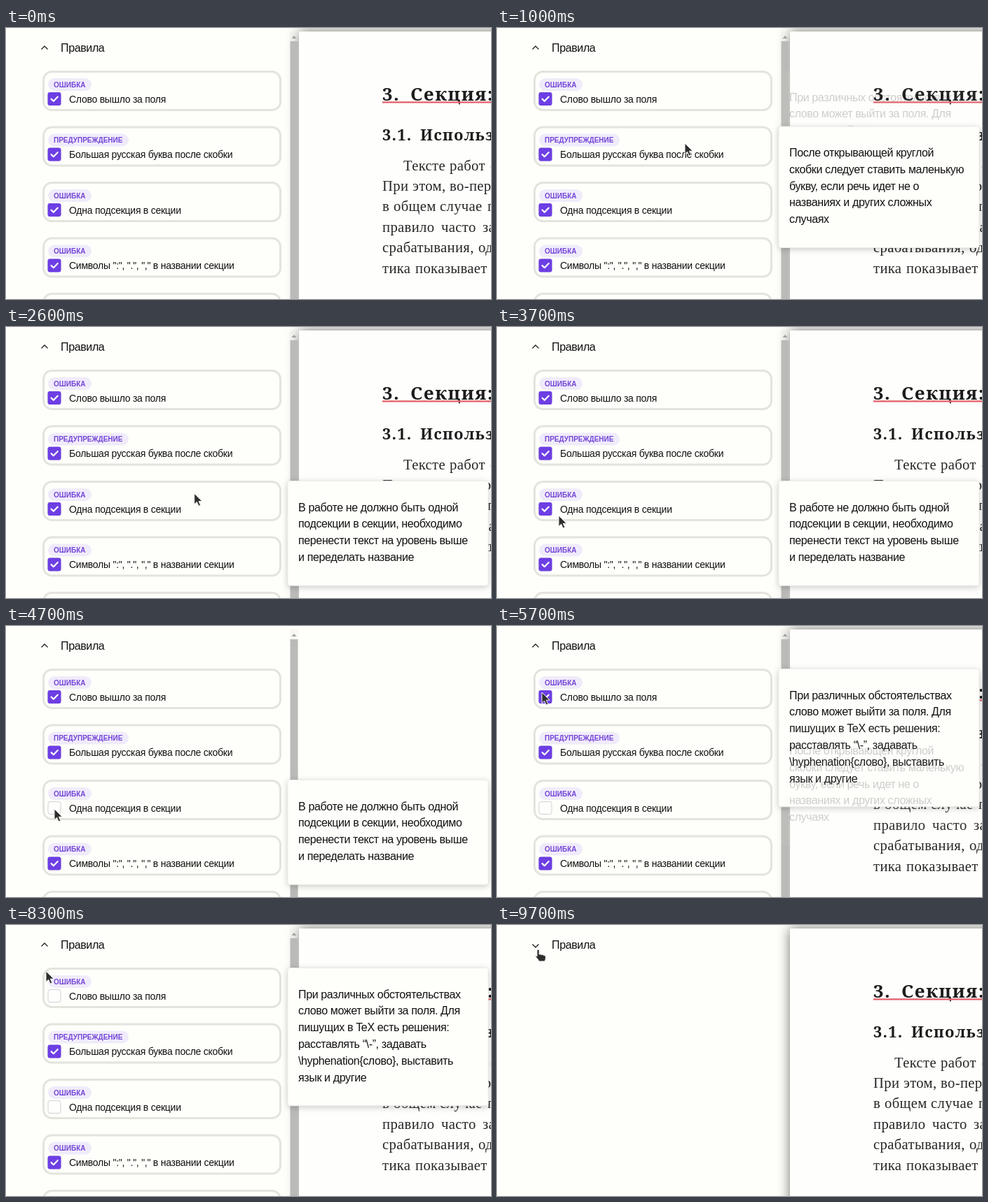
An HTML page that plays this animation: 692x388 px, repeating every 10000 ms.

```html
<!DOCTYPE html>
<html lang="ru">
<head>
<meta charset="utf-8">
<title>Правила</title>
<style>
  html, body { margin: 0; width: 100%; height: 100%; overflow: hidden; background: #fefffa; }
  svg { display: block; }
  text { font-family: "Liberation Sans", Arial, sans-serif; fill: #111; }
  .title, .tip text { font-size: 16px; letter-spacing: -.37px; }
  .label { font-size: 14px; letter-spacing: -.25px; }
  .badge { font-size: 10px; font-weight: 700; fill: #7446d6; }
  .page text { font-family: "Liberation Serif", "Times New Roman", serif; font-size: 20.6px; letter-spacing: .38px; fill: #262626; }
  .page .h1, .page .h2 { font-family: "Noto Serif", serif; font-weight: 700; fill: #1c1c1c; }
  .page .h1 { font-size: 26px; letter-spacing: 1.5px; }
  .page .h2 { font-size: 22px; letter-spacing: 1.2px; }
  .sheet { fill: #fefefc; filter: drop-shadow(0 0 9px rgba(0, 0, 0, .55)); }
  .tip rect { fill: #fefefb; stroke: #ecece8; filter: drop-shadow(0 2px 4px rgba(0, 0, 0, .2)); }
</style>
</head>
<body>
<svg id="stage" width="692" height="388" viewBox="0 0 692 388"></svg>
<script>
const NS = 'http://www.w3.org/2000/svg';
const LOOP = 10000, STEP = 100, LAST = 9700;
const stage = document.getElementById('stage');

function add(parent, tag, attrs = {}, content = '') {
  const el = document.createElementNS(NS, tag);
  for (const key in attrs) el.setAttribute(key, attrs[key]);
  el.textContent = content;
  return parent.appendChild(el);
}
const group = (attrs, parent = stage) => add(parent, 'g', attrs);
const write = (parent, x, y, content, cls = '') => add(parent, 'text', { x, y, class: cls }, content);
const show = (el, on) => { el.style.display = on ? '' : 'none'; };
const clamp = v => Math.max(0, Math.min(1, v));
const cardTop = i => 61 + i * 79.5;

// Document preview
const page = group({ class: 'page' });
add(page, 'rect', { class: 'sheet', x: 418, y: 5, width: 320, height: 440 });
const heads = [
  [104, 'h1', [[537, '3.'], [577, 'Секция:']]],
  [161, 'h2', [[537, '3.1.'], [591, 'Использование']]]
];
const lines = [
  [[567, 'Тексте'], [633, 'работ'], [691, 'с']],
  [[537, 'При'], [580, 'этом,'], [633, 'во-первых,']],
  [[537, 'в'], [553, 'общем'], [619, 'случае'], [687, 'при']],
  [[537, 'правило'], [621, 'часто'], [680, 'за']],
  [[537, 'срабатывания,'], [674, 'од']],
  [[537, 'тика'], [584, 'показывает']]
];
for (const [y, cls, words] of heads) words.forEach(([x, w]) => write(page, x, y, w, cls));
lines.forEach((words, i) => words.forEach(([x, w]) => write(page, x, 203.5 + i * 29.4, w)));
add(page, 'rect', { x: 537, y: 105.2, width: 160, height: 2.3, fill: '#e4616c' });

// Scrollbar
const bar = group({});
add(bar, 'rect', { x: 405, y: 5, width: 12, height: 383, fill: '#e6e6e3', opacity: .3 });
add(bar, 'rect', { x: 405.5, y: 19, width: 11, height: 369, fill: '#babab8' });
add(bar, 'path', { d: 'M407.5 15L411 11L414.5 15Z', fill: '#a2a2a0' });

// Rules panel
write(stage, 78, 33.5, 'Правила', 'title');
const chevron = add(stage, 'path', { fill: 'none', stroke: '#222', 'stroke-width': 1.3 });
const clip = add(add(stage, 'clipPath', { id: 'fold' }), 'rect', { x: 40, y: 50, width: 360, height: 340 });
const list = group({ 'clip-path': 'url(#fold)' });
const rules = [
  ['ОШИБКА', 62, 'Слово вышло за поля'],
  ['ПРЕДУПРЕЖДЕНИЕ', 115, 'Большая русская буква после скобки'],
  ['ОШИБКА', 62, 'Одна подсекция в секции'],
  ['ОШИБКА', 62, 'Символы ":", ".", "," в названии секции'],
  ['ОШИБКА', 62, 'Пустая секция']
];
const marks = rules.map(([kind, width, label], i) => {
  const card = group({ transform: `translate(0 ${cardTop(i)})` }, list);
  add(card, 'rect', { x: 53.5, y: 1.5, width: 338, height: 55, rx: 12, fill: 'none', stroke: '#e3e4de', 'stroke-width': 3 });
  add(card, 'rect', { x: 60, y: 11, width, height: 18, rx: 9, fill: '#f0ebfb' });
  write(card, 68, 23.7, kind, 'badge');
  write(card, 90, 45.6, label, 'label');
  add(card, 'rect', { x: 60, y: 31.5, width: 18, height: 18, rx: 3, fill: '#fefefc', stroke: '#d3d0d6' });
  const mark = group({}, card);
  add(mark, 'rect', { x: 59.5, y: 31, width: 19, height: 19, rx: 3, fill: '#6d3ee4' });
  add(mark, 'path', { d: 'M64.6 40.6L67.8 43.8L73.8 37.6', fill: 'none', stroke: '#fff', 'stroke-width': 2.2, 'stroke-linecap': 'round', 'stroke-linejoin': 'round' });
  return mark;
});

// Hints
const hints = [
  ['При различных обстоятельствах', 'слово может выйти за поля. Для', 'пишущих в TeX есть решения:',
    'расставлять “\\-”, задавать', '\\hyphenation{слово}, выставить', 'язык и другие'],
  ['После открывающей круглой', 'скобки следует ставить маленькую', 'букву, если речь идет не о',
    'названиях и других сложных', 'случаях'],
  ['В работе не должно быть одной', 'подсекции в секции, необходимо', 'перенести текст на уровень выше', 'и переделать название']
];
const tips = hints.map((rows, i) => {
  const tip = group({ class: 'tip', transform: `translate(0 ${cardTop(i)})` });
  add(tip, 'rect', { x: 402, y: .5, width: 286, height: 54.5 + rows.length * 23.8, rx: 3 });
  rows.forEach((row, n) => write(tip, 417, 43.5 + n * 23.8, row));
  return tip;
});
// hint, start, end
const visits = [[0, 500, 800], [1, 900, 1300], [2, 1400, 5100], [1, 5200, 5500], [0, 5500, 8400]];

// Pointer
const pointer = group({});
const ink = { fill: '#2e2e2e', stroke: '#f4f4f2', 'stroke-width': 1, 'stroke-linejoin': 'round' };
const arrow = add(pointer, 'path', { ...ink, d: 'M0 0V15.5L3.6 12.2L6.2 18L8.9 16.8L6.3 11.2H11.2Z' });
const hand = add(pointer, 'path', { ...ink, transform: 'scale(1.1)', d: 'M0 0Q1.5 -2 3 0V5.5Q5 4.5 6 6Q8 5 9 6.8Q11 6.3 11.3 8.3V11.5Q11 13 10 14.5H2.5Q1.5 12 -2 8.5Q-1.5 6.5 0 7.8Z' });
// time, x, y
const path = [
  [200, 252, -20], [600, 262, 85], [1000, 268, 165], [1700, 273, 232], [2300, 273, 234],
  [3000, 262, 245], [3300, 262, 245], [3700, 88, 270], [4300, 69, 262], [4900, 69, 262],
  [5300, 66, 178], [5700, 64, 95], [7700, 64, 95], [8300, 57, 66], [8700, 57, 36], [LOOP, 57, 36]
];
function locate(t) {
  const n = path.findIndex(p => p[0] > t);
  if (n < 1) return path[0].slice(1);
  const [a, b] = [path[n - 1], path[n]];
  const k = (t - a[0]) / (b[0] - a[0]);
  const e = k * k * (3 - 2 * k);
  return [a[1] + (b[1] - a[1]) * e, a[2] + (b[2] - a[2]) * e];
}

function draw(t) {
  const between = (a, b) => t >= a && t < b;
  show(page, !between(4500, 5200) && !between(6000, 6500));
  show(marks[2], t < 4500);
  show(marks[0], t < 6000);

  const fold = clamp((t - 9000) / 300);
  clip.setAttribute('height', 340 * (1 - fold));
  list.style.opacity = 1 - fold;
  show(bar, fold < 1);
  chevron.setAttribute('d', t < 9000 ? 'M50.5 30.5L55 26L59.5 30.5' : 'M50.5 27.5L55 32L59.5 27.5');

  const fades = tips.map(() => 0);
  for (const [i, from, to] of visits) {
    const level = clamp((t - from + 50) / 150) * clamp(1 - (t - to) / 250);
    if (t >= from) fades[i] = Math.max(fades[i], level);
  }
  // The box fades ahead of its text.
  tips.forEach((tip, i) => {
    tip.style.opacity = fades[i];
    tip.firstChild.style.opacity = fades[i];
    show(tip, fades[i] > 0);
  });

  const [x, y] = locate(t);
  pointer.setAttribute('transform', `translate(${x} ${y})`);
  show(arrow, t < 8500);
  show(hand, t >= 8500);
}

const start = performance.now();
function tick() {
  const t = (performance.now() - start) % LOOP;
  draw(Math.min(LAST, Math.floor(t / STEP) * STEP));
  requestAnimationFrame(tick);
}
tick();
</script>
</body>
</html>
```
